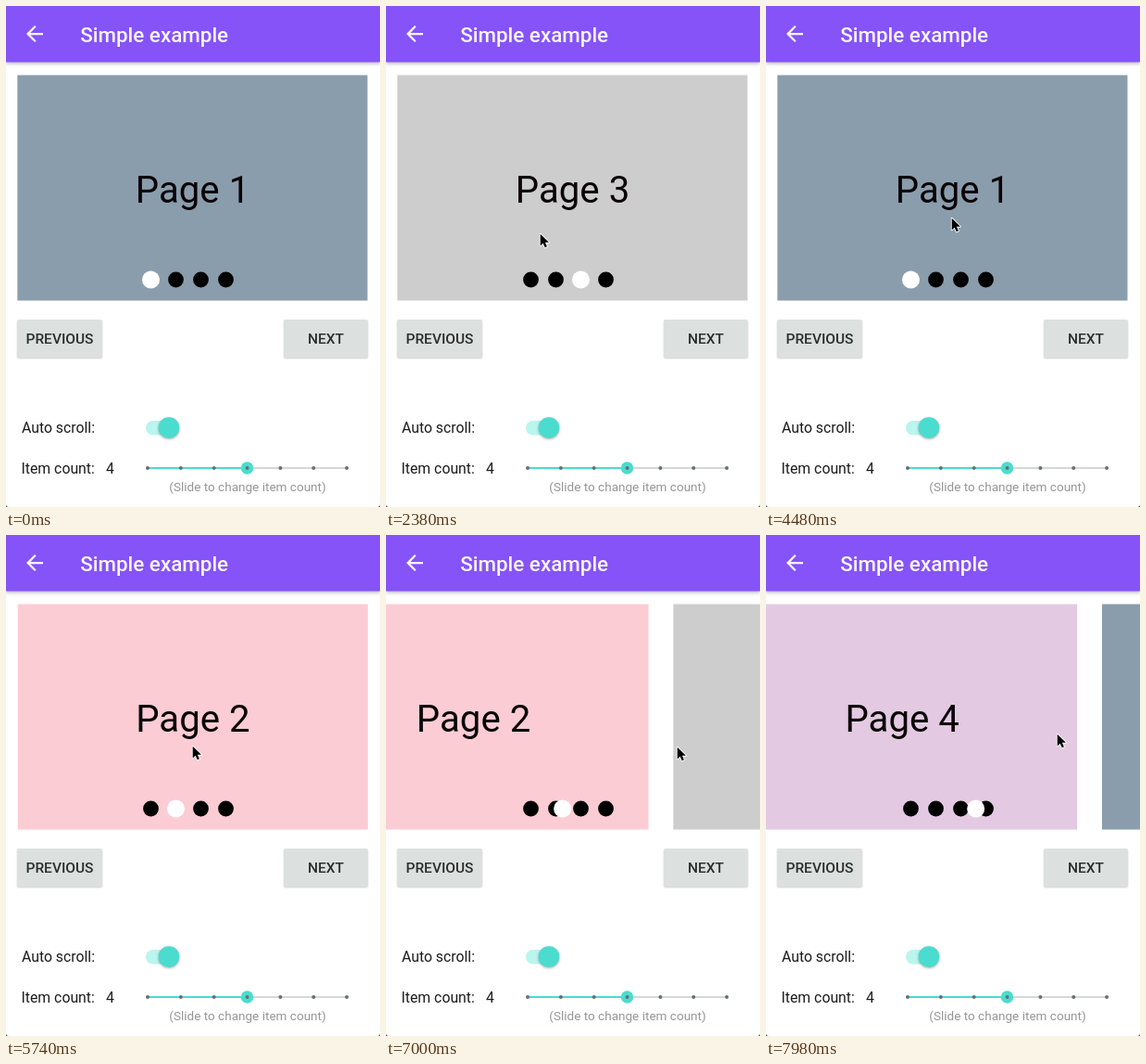
An HTML page with a canvas for the animation above (8 s loop, 404 by 540 pixels).

```html
<!DOCTYPE html>
<html lang="en">
<head>
<meta charset="utf-8">
<title>Simple example</title>
<style>
  html, body { margin: 0; width: 100%; height: 100%; overflow: hidden; background: #fff; }
  canvas { display: block; width: 404px; height: 540px; }
</style>
</head>
<body>
<canvas id="stage"></canvas>
<script>
const W = 404, H = 540, LOOP = 8000, STEP = 70;
const PITCH = 405;
const REACH = 90, DRAG = 140, SETTLE = 520; // phases of one swipe, in ms
const TEAL = '#4adccf', INK = '#1c1c1c';
const COLORS = ['#8a9dac', '#fcccd4', '#cdcdcd', '#e3cae2'];

const canvas = document.getElementById('stage');
const ctx = canvas.getContext('2d');
const dpr = window.devicePixelRatio || 1;
canvas.width = W * dpr;
canvas.height = H * dpr;

const lerp = (a, b, u) => a + (b - a) * u;
const clamp = u => Math.min(1, Math.max(0, u));
const mod4 = n => (n % 4 + 4) % 4;

// A swipe starts at the far side and leaves the pointer resting at (x, y).
const forward = (press, x, y) => ({ press, x, y, from: 320, dir: 1 });
const backward = (press, y) => ({ press, x: 314, y, from: 150, dir: -1 });
const SWIPES = [
  forward(416, 204, 254), forward(1710, 166, 245), forward(2560, 190, 231),
  forward(3610, 200, 228), forward(5220, 201, 227), forward(6040, 190, 230),
  backward(6782, 228), backward(7240, 221), backward(7706, 214)
];

function pointerAt(t) {
  let x = W + 16, y = 250;
  for (const s of SWIPES) {
    const reach = clamp((t - s.press + REACH) / REACH);
    const drag = clamp((t - s.press) / DRAG);
    x = lerp(lerp(x, s.from, reach), s.x, drag);
    y = lerp(y, s.y, reach);
  }
  return [x, y];
}

// The page follows the pointer, then settles with a quintic ease-out.
function swipeProgress(t, s) {
  const dragged = Math.abs(s.x - s.from) / PITCH * clamp((t - s.press) / DRAG);
  const u = clamp((t - s.press - DRAG) / SETTLE);
  return 1 - (1 - dragged) * (1 - u) ** 5;
}

const positionAt = t => SWIPES.reduce((sum, s) => sum + s.dir * swipeProgress(t, s), 0);

function rect(x, y, w, h, color, r = 0) {
  ctx.fillStyle = color;
  ctx.beginPath();
  ctx.roundRect(x, y, w, h, r);
  ctx.fill();
}

function circle(x, y, r, color) {
  ctx.fillStyle = color;
  ctx.beginPath();
  ctx.arc(x, y, r, 0, Math.PI * 2);
  ctx.fill();
}

function text(str, x, y, size, color, align = 'left', weight = 400) {
  ctx.font = `${weight} ${size}px Roboto, sans-serif`;
  ctx.fillStyle = color;
  ctx.textAlign = align;
  ctx.fillText(str, x, y);
}

function withShadow(color, blur, dy, draw) {
  ctx.save();
  ctx.shadowColor = color;
  ctx.shadowBlur = blur * dpr;
  ctx.shadowOffsetY = dy * dpr;
  draw();
  ctx.restore();
}

const backArrow = new Path2D('M20 11H7.83l5.59-5.59L12 4l-8 8 8 8 1.41-1.41L7.83 13H20z');
const cursor = new Path2D('M0 0V14.5L3.4 11.3L5.7 16.6L8.2 15.5L5.9 10.4H10.5Z');

function drawHeader() {
  withShadow('rgba(0,0,0,.3)', 4, 1, () => rect(0, -10, W, 70.5, '#8553f7'));
  ctx.save();
  ctx.translate(17.5, 16.5);
  ctx.scale(1.125, 1.125);
  ctx.fillStyle = '#fbf7ff';
  ctx.fill(backArrow);
  ctx.restore();
  text('Simple example', 80.2, 38.5, 22.4, '#fbf7ff', 'left', 500);
}

function drawPages(pos) {
  const first = Math.floor(pos);
  for (let n = first; n <= first + 1; n++) {
    const x = (n - pos) * PITCH;
    const page = mod4(n);
    rect(12.3 + x, 74.4, 378.2, 243.2, COLORS[page]);
    text(`Page ${page + 1}`, 201.5 + x, 212, 40.2, '#0a0406', 'center');
  }
}

function drawDots(pos) {
  const dotX = i => 156.5 + i * 27;
  for (let i = 0; i < 4; i++) circle(dotX(i), 295, 8.4, '#000');
  const p = mod4(pos);
  circle(dotX(Math.min(p, 3 * (4 - p))), 295, 9.5, '#fff');
}

function drawButton(label, x, w) {
  withShadow('rgba(0,0,0,.2)', 2, 1, () => rect(x, 338, w, 41, '#dce0de', 2));
  text(label, x + w / 2, 364.3, 15.5, '#2b2e2d', 'center', 500);
}

function drawControls() {
  drawButton('PREVIOUS', 12, 92);
  drawButton('NEXT', 300, 91);

  text('Auto scroll:', 17, 460.3, 15.8, INK);
  rect(151, 447, 35, 15.5, '#baf5ee', 8);
  withShadow('rgba(0,0,0,.35)', 3, 1, () => circle(176, 454.5, 11.2, TEAL));

  text('Item count:', 16.5, 504.3, 15.8, INK);
  text('4', 108, 504.3, 15.8, INK);
  rect(260, 497, 108, 2, '#d6d8d8');
  rect(153, 496.9, 108, 2.2, TEAL);
  circle(260.5, 498, 6.7, TEAL);
  for (let i = 0; i < 7; i++) circle(153 + i * 35.85, 498, 2, '#66706f');
  text('(Slide to change item count)', 261, 522.6, 13.55, '#969696', 'center');
}

function drawPointer(t) {
  const [x, y] = pointerAt(t);
  ctx.save();
  ctx.translate(x + 0.7, y + 0.7);
  ctx.scale(0.88, 0.88);
  ctx.lineJoin = 'round';
  ctx.lineWidth = 2;
  ctx.strokeStyle = '#fff';
  ctx.stroke(cursor);
  ctx.fillStyle = '#000';
  ctx.fill(cursor);
  ctx.restore();
}

function frame(now) {
  const t = Math.floor((now % LOOP) / STEP) * STEP;
  const pos = positionAt(t);
  ctx.setTransform(dpr, 0, 0, dpr, 0, 0);
  rect(0, 0, W, H, '#444');
  rect(0, 0, W, H, '#fff', [0, 0, 3, 3]);
  drawPages(pos);
  drawDots(pos);
  drawHeader();
  drawControls();
  drawPointer(t);
}

let start;
function tick(now) {
  start ??= now;
  frame(Math.max(0, now - start));
  requestAnimationFrame(tick);
}
frame(0);
requestAnimationFrame(tick);
</script>
</body>
</html>
```
